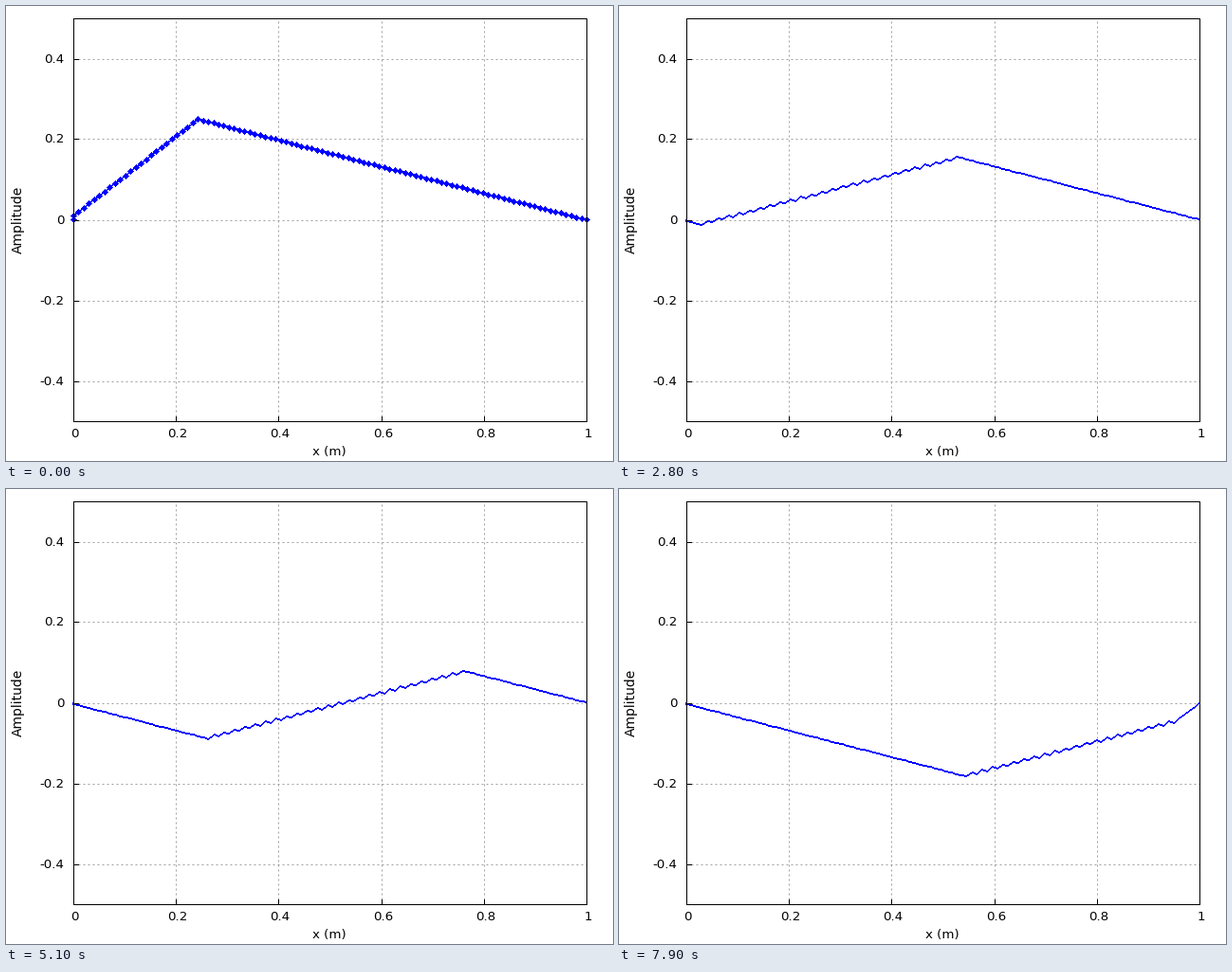
These frames come from a looping animation (640x480 px, 8000 ms). A matplotlib script:

```python
import numpy as np
import matplotlib.pyplot as plt
from matplotlib.animation import FuncAnimation
from matplotlib.collections import PolyCollection
from matplotlib.patches import Polygon

W, H, DPI = 640, 480, 100
PX = 72 / DPI                      # one pixel in points
LEFT, RIGHT, TOP, BOTTOM = 71, 612, 13, 438
STEPS, INTERVAL = 80, 100
N, PLUCK = 100, 25                 # string segments, plucked node
BLUE, GRID = "#0000ff", "#a0a0a0"

plt.rcParams["font.family"] = "DejaVu Sans"
fig = plt.figure(figsize=(W / DPI, H / DPI), dpi=DPI, facecolor="white")
ax = fig.add_axes([0, 0, 1, 1])
ax.set_xlim(0, W)
ax.set_ylim(H, 0)
ax.axis("off")


def col(x):
    return np.floor(LEFT + x * (RIGHT - LEFT) + 0.5)


def row(y):
    up = np.floor((y + 0.5) * (BOTTOM - TOP) + (H - 1 - BOTTOM) + 0.5)
    return H - 1 - up


def rule(xs, ys, color="black", dashes=None, z=5):
    """One-pixel line through pixel centres."""
    ax.plot(np.array(xs) + 0.5, np.array(ys) + 0.5, color=color, lw=PX,
            ls=(0, dashes) if dashes else "-", snap=False, zorder=z,
            solid_capstyle="projecting", solid_joinstyle="miter",
            dash_capstyle="butt")


def label(x, y, text, ha="center", size=9.6, **kw):
    ax.text(x, y, text, ha=ha, va="baseline", fontsize=size, **kw)


def stairs(x, top, bottom):
    """Outline of pixel columns starting at x, from top to bottom edges."""
    edges = np.repeat(np.append(x, x[-1] + 1), 2)[1:-1]
    upper = np.column_stack([edges, np.repeat(top, 2)])
    lower = np.column_stack([edges, np.repeat(bottom, 2)])
    return np.vstack([upper, lower[::-1]])


def simulate():
    """Leapfrog wave equation at Courant number 1, string released at rest."""
    j = np.arange(N + 1)
    now = np.where(j <= PLUCK, 0.01 * j, (N - j) / 300)
    prev = now.copy()
    shapes = [now]
    for _ in range(STEPS - 1):
        new = np.zeros(N + 1)
        new[1:-1] = now[2:] + now[:-2] - prev[1:-1]
        prev, now = now, new
        shapes.append(now)
    return shapes


# Axes
for k in range(6):
    x = col(k / 5)
    if 0 < k < 5:
        rule([x, x], [BOTTOM, TOP], GRID, (2, 3), 1)
    rule([x, x], [BOTTOM, BOTTOM - 5])
    label(x + 1.5, 455, f"{k / 5:g}")

for value, y in zip((0.4, 0.2, 0, -0.2, -0.4), (56, 140, 226, 311, 396)):
    rule([LEFT, RIGHT], [y, y], GRID, (2, 3), 1)
    rule([LEFT, LEFT + 5], [y, y])
    label(61.5, y + 4, f"{value:g}".replace("-", "-"), ha="right")

rule([LEFT, RIGHT, RIGHT, LEFT, LEFT], [TOP, TOP, BOTTOM, BOTTOM, TOP])
label(340.5, 474, "x (m)")
label(17, 225, "Amplitude", size=10, rotation=90, rotation_mode="anchor")

# String: the first two nodes share x = 0
shapes = simulate()
cols = col(np.maximum(np.arange(N + 1) - 1, 0) / (N - 1))
pixels = np.arange(LEFT - 1, RIGHT + 1)


def ribbon(rows):
    """Two-pixel line, with an upright joining the shared nodes."""
    mid = np.floor(np.interp(pixels, cols[1:], rows[1:]) + 0.5)
    top, bottom = mid - 1, mid + 1
    top[:2], bottom[:2] = rows[:2].min(), rows[:2].max() + 1
    return stairs(pixels, top, bottom)


string = Polygon(ribbon(row(shapes[0])), fc=BLUE, ec="none", snap=False,
                 zorder=3)
ax.add_patch(string)

# Diamond markers on the string at rest
across = np.arange(-3, 4)
reach = 3 - np.abs(across)
diamond = stairs(across, -reach, reach + 1)
centres = np.column_stack([cols, row(shapes[0])])
dots = PolyCollection(centres[:, None] + diamond, facecolors=BLUE,
                      edgecolors="none", snap=False, zorder=4)
ax.add_collection(dots, autolim=False)


def draw(i):
    string.set_xy(ribbon(row(shapes[i])))
    dots.set_visible(i == 0)
    return string, dots


anim = FuncAnimation(fig, draw, frames=STEPS, interval=INTERVAL,
                     repeat=True, repeat_delay=0)
plt.show()
```
